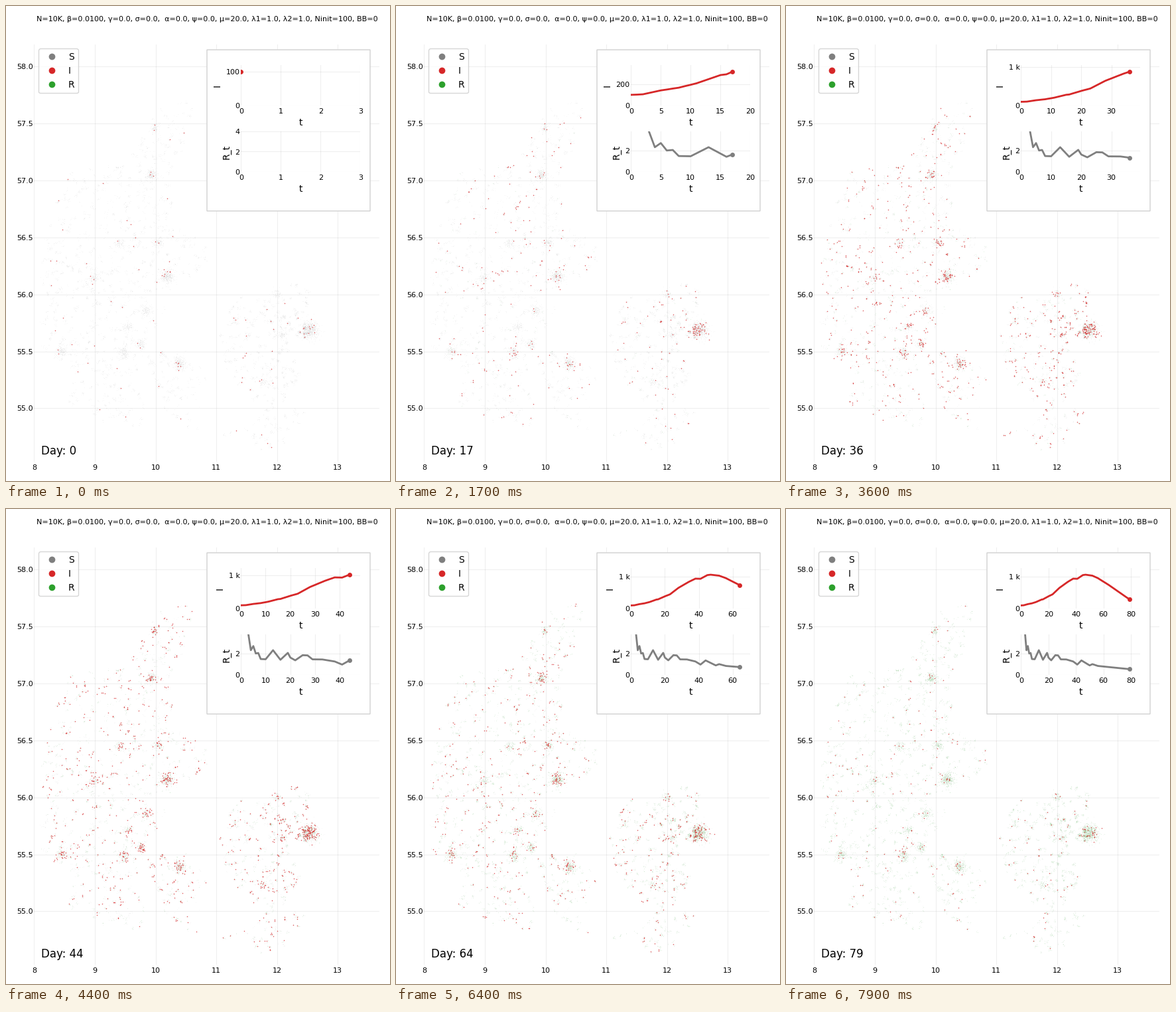
A matplotlib script that plays this animation: 579 by 716 pixels, repeating every 8 s.

```python
import numpy as np
import matplotlib.pyplot as plt
from matplotlib.animation import FuncAnimation
from matplotlib.lines import Line2D
from matplotlib.patches import Rectangle
from matplotlib.path import Path
from matplotlib.ticker import EngFormatter, MultipleLocator

W, H, DPI = 579, 716, 100
DAYS, N, N_INIT = 80, 10_000, 100
RED, GRAY, GREEN = "tab:red", "tab:gray", "tab:green"
plt.rcParams.update({"font.family": "DejaVu Sans", "font.size": 10,
                     "xtick.labelsize": 8, "ytick.labelsize": 8})
rng = np.random.default_rng(7)
day = np.arange(DAYS)


# ---- daily curves from their turning points -----------------------------
def curve(*points):
    return np.interp(day, *np.transpose(points), left=np.nan)


infected = curve((0, N_INIT), (2, 105), (5, 141), (8, 166), (11, 207), (15, 283),
                 (16, 290), (20, 384), (23, 446), (28, 648), (34, 832), (38, 935),
                 (41, 930), (45, 1045), (47, 1058), (52, 1028), (56, 950),
                 (64, 735), (79, 288)).round()
r_t = curve((3, 3.83), (4, 2.33), (5, 2.72), (6, 2.02), (7, 2.07), (8, 1.5),
            (10, 1.48), (13, 2.33), (16, 1.43), (19, 2.08), (20, 1.64),
            (22, 1.38), (25, 1.86), (27, 1.84), (29, 1.47), (33, 1.46),
            (38, 1.27), (41, 0.98), (44, 1.37), (50, 0.9), (52, 1.02),
            (56, 0.85), (79, 0.55))

# ---- where people live (longitude, latitude) ----------------------------
west = [(10.6, 57.73), (9.95, 57.6), (9.55, 57.17), (8.6, 57.11), (8.13, 56.6),
        (8.1, 55.55), (8.6, 55.3), (8.55, 55.05), (9.35, 54.82), (9.95, 54.88),
        (9.65, 55.25), (10.25, 56.0), (10.3, 56.2), (10.75, 56.14),
        (10.92, 56.45), (10.25, 56.6), (10.3, 56.98), (10.53, 57.3)]
middle = [(9.82, 55.5), (10.45, 55.6), (10.85, 55.28), (10.7, 54.75), (10.1, 55.0)]
east = [(11.03, 55.7), (11.3, 55.98), (11.95, 55.97), (12.3, 56.13),
        (12.6, 56.04), (12.5, 55.9), (12.65, 55.6), (12.25, 55.5),
        (12.4, 55.25), (12.1, 55.02), (12.48, 54.97), (12.0, 54.6),
        (11.05, 54.75), (11.85, 54.97), (11.15, 55.3)]
land = [Path(p) for p in (west, middle, east)]

# Towns, largest first; the size falls with rank
towns = np.array([(12.54, 55.69), (10.19, 56.16), (10.39, 55.4), (9.93, 57.05),
                  (8.45, 55.5), (10.04, 56.46), (9.75, 55.56), (9.54, 55.71),
                  (9.48, 55.49), (9.85, 55.86), (12.08, 55.65), (8.97, 56.14),
                  (9.4, 56.45), (12.0, 56.0), (11.76, 55.23), (9.98, 57.46)])
size = 1 / np.arange(1, len(towns) + 1) ** 0.8


def on_land(count):
    p = rng.uniform((8.05, 54.55), (12.7, 57.75), (count * 8, 2))
    return p[np.any([s.contains_points(p) for s in land], axis=0)][:count]


def settle(centres, weights, spread, count):
    """Scatter people around centres chosen by weight."""
    k = rng.choice(len(centres), count, p=weights / weights.sum())
    s = np.broadcast_to(spread, len(centres))[k, None]
    return centres[k] + rng.normal(size=(count, 2)) * s * (1, 0.55)


villages = on_land(1100)
far = np.hypot(*((villages - towns[0]) * (0.56, 1)).T)
crowd = (0.4 + rng.random(len(villages))) * (1 + 4 * np.exp(-far / 0.2))
n_town = N * 32 // 100
people = rng.permutation(np.vstack([
    settle(towns, size, 0.035 + 0.035 * size, n_town),
    settle(villages, crowd, 0.014, N - n_town)]))

# ---- epidemic: eight one-day stages from infection to recovery ----------
start = np.full(N, np.inf)
end = np.full(N, np.inf)
used = 0
for d in day:
    ill = np.count_nonzero((start <= d) & (end > d))
    new = slice(used, used + max(0, int(infected[d]) - ill))
    start[new] = d
    end[new] = d + 0.5 + rng.gamma(8, 1, new.stop - new.start)
    used = new.stop

# ---- figure -------------------------------------------------------------
fig = plt.figure(figsize=(W / DPI, H / DPI), dpi=DPI, facecolor="white")


def add_axes(x0, y0, x1, y1, z):
    ax = fig.add_axes([x0 / W, 1 - y1 / H, (x1 - x0) / W, (y1 - y0) / H], zorder=z)
    ax.spines[:].set_visible(False)
    ax.grid(color="#b0b0b0", alpha=0.2, lw=0.8)
    ax.set_axisbelow(True)
    ax.tick_params(axis="x", length=0, pad=3)
    ax.tick_params(axis="y", length=0, pad=1.2)
    return ax


world = add_axes(42.4, 57.5, 563, 686.5, 0)
world.set(xlim=(8, 13.686), ylim=(54.533, 58.198))
world.xaxis.set_major_locator(MultipleLocator(1))
world.yaxis.set_major_locator(MultipleLocator(0.5))


def dots(color, ms, alpha):
    return world.plot([], [], "o", color=color, ms=ms, mew=0, alpha=alpha)[0]


healthy = dots(GRAY, 0.7, 0.04)
immune = dots(GREEN, 0.9, 0.11)
sick = dots(RED, 1.1, 0.75)

keys = [Line2D([], [], ls="", marker="o", ms=7, mew=0, color=c)
        for c in (GRAY, RED, GREEN)]
world.legend(keys, "SIR", loc="upper left")

fig.text(46 / W, 1 - 23 / H,
         "N=10K, β=0.0100, γ=0.0, σ=0.0,  α=0.0, ψ=0.0, μ=20.0, "
         "λ1=1.0, λ2=1.0, Ninit=100, BB=0", size=8)
label = fig.text(52.8 / W, 1 - 676.5 / H, "", size=12)

fig.add_artist(Rectangle((303 / W, 1 - 309 / H), 246 / W, 243 / H, zorder=1, snap=False,
                         transform=fig.transFigure, fc="white", ec="0.82", lw=1))


def add_chart(top, name, color):
    ax = add_axes(354.3, top, 534.3, top + 61.4, 2)
    ax.patch.set_visible(False)
    ax.set_xlabel("t", labelpad=3.2)
    ax.set_ylabel(name)
    line, = ax.plot([], [], color=color, lw=2)
    tip, = ax.plot([], [], "o", color=color, ms=5, mew=0)
    return ax, line, tip


chart_i = add_chart(88.8, "I", RED)
chart_r = add_chart(188.8, "R_t", GRAY)
chart_i[0].yaxis.set_major_formatter(EngFormatter())


def show(chart, values, d, top):
    ax, line, tip = chart
    line.set_data(day[:d + 1], values[:d + 1])
    tip.set_data([d], [values[d]])
    ax.set(xlim=(0, max(d + 3, 1.1 * d)), ylim=(0, top))


def update(d):
    well, done = start > d, end <= d
    for art, mask in ((healthy, well), (immune, done), (sick, ~well & ~done)):
        art.set_data(*people[mask].T)
    label.set_text(f"Day: {d}")
    show(chart_i, infected, d, 1.2 * infected[:d + 1].max())
    show(chart_r, r_t, d, 4 if d < 3 else r_t[3])


anim = FuncAnimation(fig, update, frames=DAYS, interval=100,
                     init_func=lambda: None, repeat=True, repeat_delay=0, blit=False)
plt.show()
```
